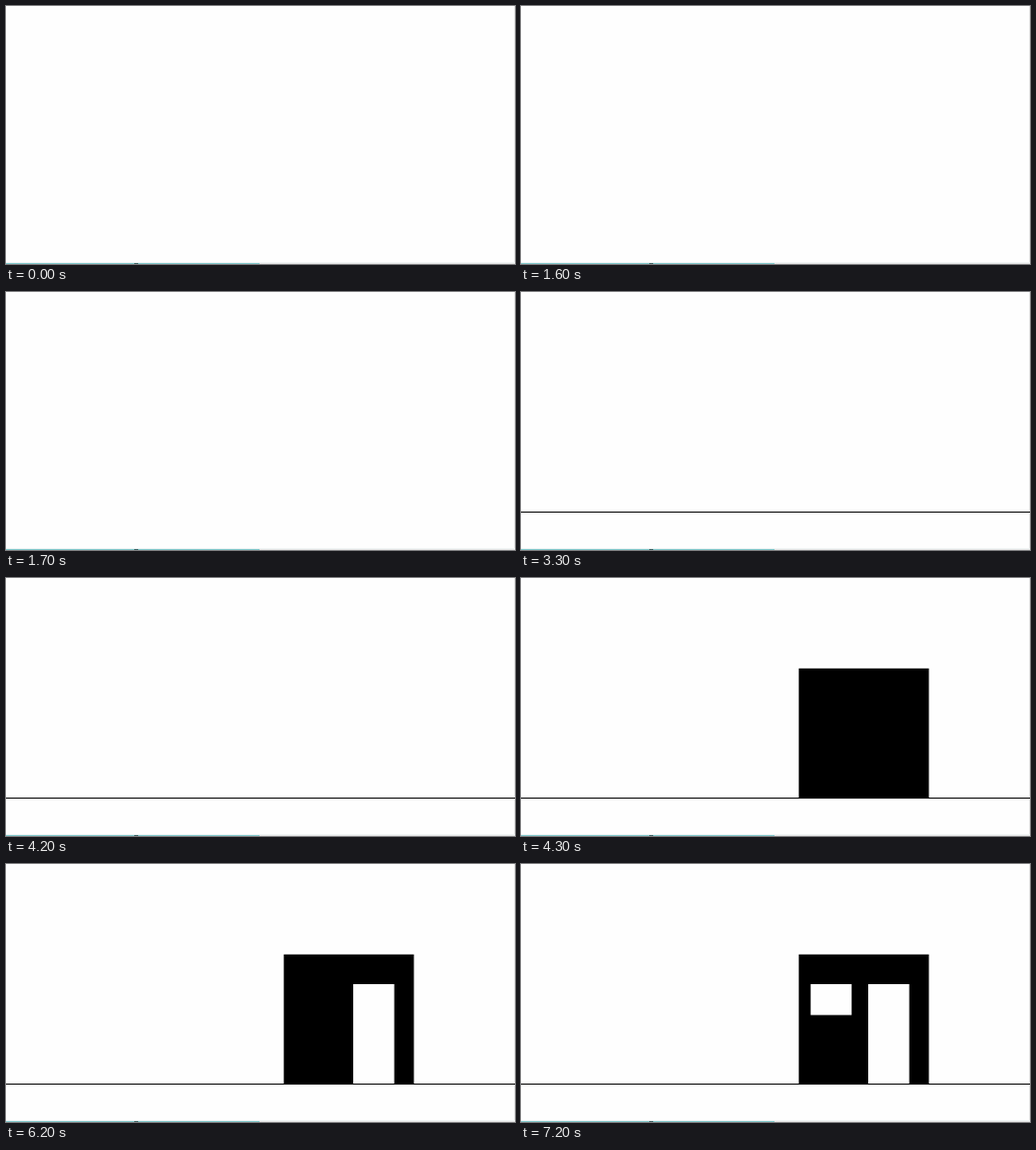
Write an HTML page that moves like this. It is 516 px wide and 262 px high and loops after 8 s.

```html
<!DOCTYPE html>
<html lang="en">
<head>
<meta charset="utf-8">
<title>Drawing a house</title>
<style>
  html, body { margin: 0; width: 100%; height: 100%; overflow: hidden; background: #fefefe; }
  svg { display: block; width: 516px; height: 262px; }
</style>
</head>
<body>
<svg viewBox="0 0 516 262">
  <g id="frame">
    <rect x="515" width="1" height="262" fill="#e8e8e8"/>
    <rect y="260" width="516" height="1" fill="#f1f5f5"/>
    <rect y="261" width="257" height="1" fill="#82c9cc"/>
    <rect x="257" y="261" width="259" height="1" fill="#e6e6e6"/>
    <rect x="130" y="261" width="4" height="1" fill="#3f6466"/>
  </g>
  <rect id="ground" y="223" width="516" height="1"/>
  <rect id="house" x="281.6" y="91.8" width="131.9" height="132.2"/>
  <rect id="door" x="352" y="122" width="41.6" height="101" fill="#fefefe"/>
  <rect id="window" x="293.6" y="122" width="41.6" height="31.4" fill="#fefefe"/>
</svg>
<script>
  const LOOP = 8000;
  const appearsAt = { ground: 3300, house: 4300, door: 6200, window: 7200 };

  for (const [id, time] of Object.entries(appearsAt)) {
    document.getElementById(id).animate(
      [
        { opacity: 0, offset: 0, easing: 'step-end' },
        { opacity: 1, offset: time / LOOP, easing: 'step-end' },
        { opacity: 1, offset: 1 }
      ],
      { duration: LOOP, iterations: Infinity }
    ).startTime = 0;
  }
</script>
</body>
</html>
```
